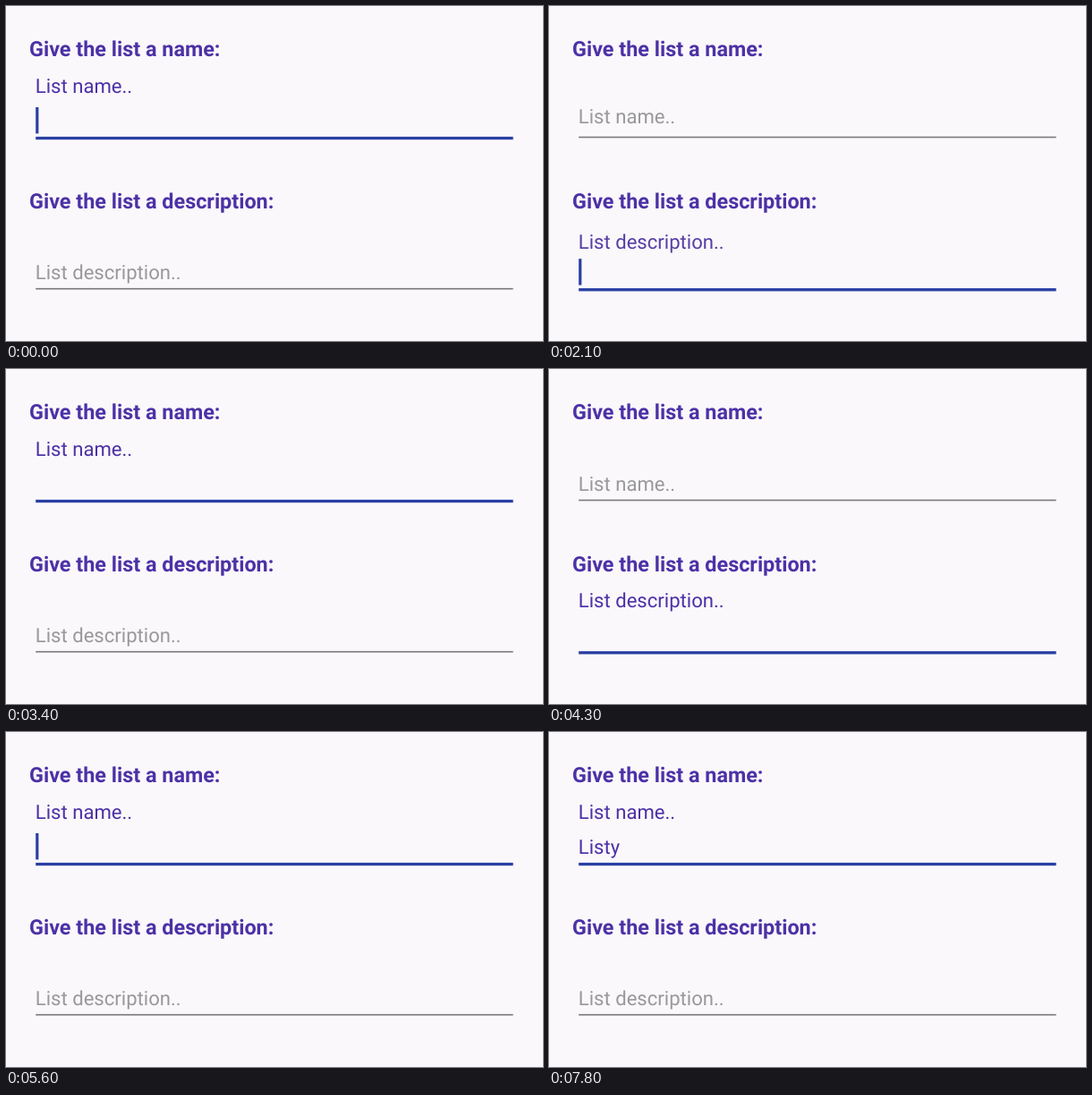
An HTML page with a canvas for the animation above (8000 ms loop, 600 by 374 pixels).

```html
<!DOCTYPE html>
<html lang="en">
<head>
<meta charset="utf-8">
<title>List form</title>
<style>
  html, body { margin: 0; width: 100%; height: 100%; overflow: hidden; background: #faf8fb; }
  canvas { display: block; width: 600px; height: 374px; }
</style>
</head>
<body>
<canvas id="stage"></canvas>
<script>
const W = 600, H = 374, LOOP = 8000, STEP = 100, SLIDE = 200, BLINK = 500;
const LEFT = 33.2, RIGHT = 566.6, RISE = 39;
const FONT = 'Roboto, "Open Sans", sans-serif';
const PURPLE = [76, 49, 166], GREY = [153, 152, 154];
const ACCENT = '#2a3fa3', RULE = '#79787b';

const fields = [
  { title: 'Give the list a name:', hint: 'List name..', top: 0 },
  { title: 'Give the list a description:', hint: 'List description..', top: 169.2 }
];

// lead: how far the slide has run when the focus change first shows
const focusChanges = [
  { at: 0, field: 0, lead: SLIDE },
  { at: 2000, field: 1, lead: 53 },
  { at: 2900, field: 0, lead: 115 },
  { at: 3800, field: 1, lead: 100 },
  { at: 4600, field: 0, lead: 100 }
];

const edits = [
  { at: 0, text: '' },
  { at: 6000, text: 'L', composing: true },
  { at: 6100, text: 'Li', composing: true },
  { at: 6400, text: 'Lis', composing: true },
  { at: 6700, text: 'List', composing: true },
  { at: 6800, text: 'Listy', composing: true },
  { at: 7300, text: 'Listy ' }
];

const canvas = document.getElementById('stage');
const ctx = canvas.getContext('2d');
const dpr = window.devicePixelRatio || 1;
canvas.width = W * dpr;
canvas.height = H * dpr;
ctx.scale(dpr, dpr);
ctx.textRendering = 'geometricPrecision';

const latest = (list, t) => list.filter(e => e.at <= t).pop();
const ease = x => (1 - Math.cos(Math.PI * Math.min(1, x))) / 2;
const rgb = c => `rgb(${c.map(Math.round).join(',')})`;
const mix = (a, b, k) => rgb(a.map((v, i) => v + (b[i] - v) * k));

function bar(x, y, w, h, color) {
  ctx.fillStyle = color;
  ctx.fillRect(x, y, w, h);
}

function write(text, x, y, font, color) {
  ctx.font = `${font} ${FONT}`;
  ctx.fillStyle = color;
  ctx.fillText(text, x, y);
}

function drawField(f, focused, slide, edit, cursorOn) {
  const y = f.top, base = y + 136;
  const raised = focused ? slide : 1 - slide;
  write(f.title, 26, y + 56.4, 'bold 23.4px', rgb(PURPLE));
  write(f.hint, LEFT - 0.4, base - RISE * raised, '22.1px', focused ? mix(GREY, PURPLE, slide) : rgb(GREY));

  if (focused) bar(LEFT, y + 145.9, RIGHT - LEFT, 3.3, ACCENT);
  else bar(LEFT, y + 145.7, RIGHT - LEFT, 1.6, RULE);

  if (!focused) return;
  write(edit.text, LEFT - 0.4, base, '22.1px', rgb(PURPLE));
  const width = ctx.measureText(edit.text).width;
  if (edit.composing) bar(LEFT, base + 2.4, width, 1.2, rgb(PURPLE));
  if (cursorOn) bar(LEFT + width, y + 113, 3.2, 29.4, ACCENT);
}

function draw(now) {
  const t = Math.floor((now % LOOP) / STEP) * STEP;
  const focus = latest(focusChanges, t);
  const edit = latest(edits, t);
  const slide = ease((t - focus.at + focus.lead) / SLIDE);
  const idle = t - Math.max(focus.at, edit.at);
  const cursorOn = Math.floor(idle / BLINK) % 2 === 0;

  bar(0, 0, W, H, '#faf8fb');
  fields.forEach((f, i) => drawField(f, i === focus.field, slide, edit, cursorOn));
}

const start = performance.now();
function tick() {
  draw(performance.now() - start);
  requestAnimationFrame(tick);
}
tick();
</script>
</body>
</html>
```
